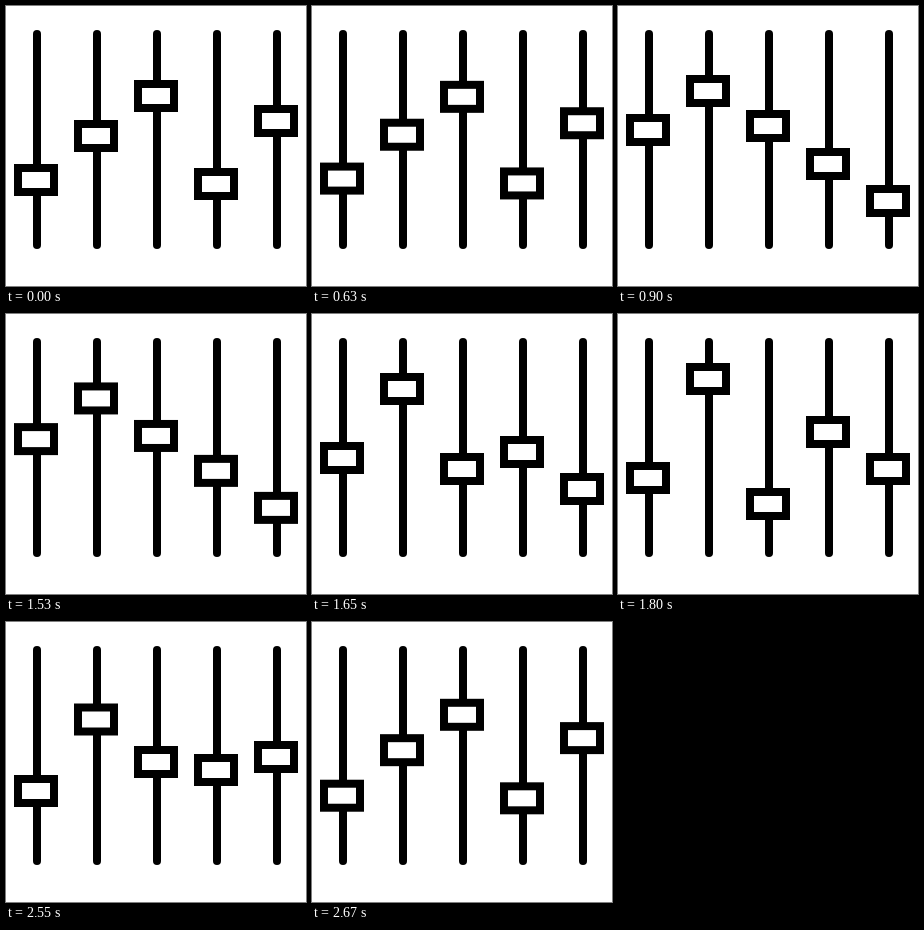
Write an HTML page with a canvas that moves like this. It is 300x280 px and loops after 2700 ms.

```html
<!DOCTYPE html>
<html lang="en">
<head>
<meta charset="utf-8">
<title>Sliders</title>
<style>
  html, body { margin: 0; height: 100%; overflow: hidden; background: #fff; }
  canvas { display: block; }
</style>
</head>
<body>
<canvas id="stage" width="300" height="280"></canvas>
<script>
const ctx = document.getElementById('stage').getContext('2d');

// Handle centres for each resting pose, left to right
const poses = [
  [174, 130, 90, 178, 115],
  [124, 85, 120, 158, 195],
  [164, 65, 190, 118, 155]
];
const HOLD = 600, MOVE = 300, STEP = 30;
const PHASE = HOLD + MOVE, LOOP = PHASE * poses.length;

const ease = p => p * p * (3 - 2 * p);

function drawSlider(x, y) {
  ctx.beginPath();
  ctx.moveTo(x + 1, 28);
  ctx.lineTo(x + 1, 239);
  ctx.stroke();
  ctx.fillRect(x - 18, y - 12, 36, 24);
  ctx.strokeRect(x - 18, y - 12, 36, 24);
}

function draw(now) {
  const t = Math.floor((now % LOOP) / STEP) * STEP;
  const i = Math.floor(t / PHASE);
  const k = ease(Math.max(0, t % PHASE - HOLD) / MOVE);
  const from = poses[i], to = poses[(i + 1) % poses.length];

  ctx.fillStyle = '#fff';
  ctx.fillRect(0, 0, 300, 280);
  ctx.strokeStyle = '#000';
  ctx.lineWidth = 8;
  ctx.lineCap = 'round';
  from.forEach((y, n) => drawSlider(30 + 60 * n, y + (to[n] - y) * k));
}

const start = performance.now();
function tick() {
  draw(performance.now() - start);
  requestAnimationFrame(tick);
}
tick();
</script>
</body>
</html>
```
